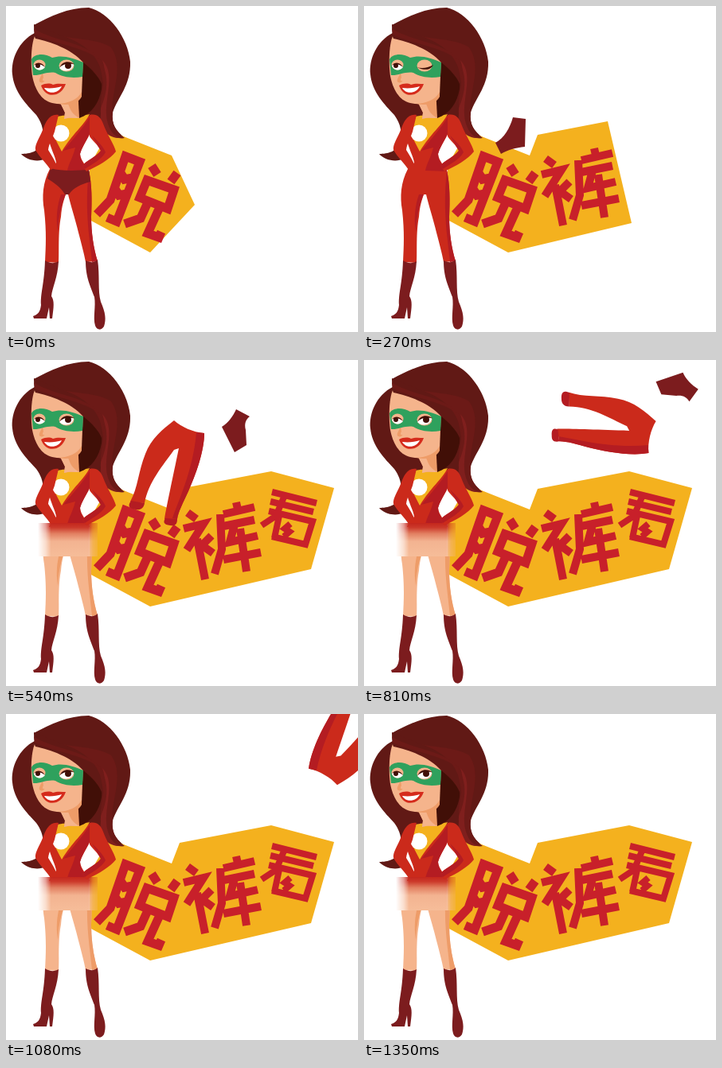
These frames come from a looping animation (442 by 410 pixels, 1.62 s). An HTML page:

```html
<!DOCTYPE html>
<html lang="zh">
<head>
<meta charset="utf-8">
<title>脱裤看</title>
<style>
  html, body { margin: 0; width: 100%; height: 100%; overflow: hidden; background: #fff; }
  svg { display: block; width: 442px; height: 410px; }
  .hair { fill: #611915; }
  .wave { fill: #6c1a17; }
  .lock { fill: #7f1f1d; }
  .deep { fill: #410f07; }
  .skin { fill: #f5b48c; }
  .tan { fill: #ee9c68; }
  .red { fill: #cb2a1b; }
  .shade { fill: #b41c22; }
  .dark { fill: #7c1c1e; }
  .gold { fill: #f4b11e; }
  .ink { fill: none; stroke: #c8202a; }
</style>
</head>
<body>
<svg viewBox="0 0 442 410">
  <defs>
    <linearGradient id="fade" x2="0" y2="1">
      <stop offset="0" stop-color="#c4261d"/>
      <stop offset=".14" stop-color="#cc3a2b"/>
      <stop offset=".32" stop-color="#e28062"/>
      <stop offset=".55" stop-color="#f3b391"/>
      <stop offset="1" stop-color="#f6bd99"/>
    </linearGradient>
    <linearGradient id="sides">
      <stop offset="0" stop-color="#000"/>
      <stop offset=".13" stop-color="#777"/>
      <stop offset=".22" stop-color="#fff"/>
      <stop offset=".85" stop-color="#fff"/>
      <stop offset=".92" stop-color="#777"/>
      <stop offset="1" stop-color="#333"/>
    </linearGradient>
    <mask id="soft"><rect x="40" y="205" width="75" height="42" fill="url(#sides)"/></mask>
    <clipPath id="low"><path d="M0 247H442V410H0Z"/></clipPath>
    <path id="legs" d="M55 205C46 222 45 240 48 257C51 285 50 302 49 322L66 323C67 310 65 285 69 265C70 251 73 243 75 237L78 237C81 250 87 268 91 285C95 300 98 312 100 322L115 321C110 305 107 285 107 265C108 245 108 225 104 206Z"/>
    <path id="legShade" d="M75 237C70 248 66 264 65 284C62 265 65 248 69 237ZM104 207C101 235 101 262 105 295L108 322L115 321C110 305 107 285 107 265C108 245 108 225 104 207Z"/>
  </defs>

  <path class="hair" d="M36 34C16 44 6 67 8 86C10 108 26 124 38 137C46 148 49 160 44 172C42 183 30 186 19 186C26 194 40 197 50 192L56 150L104 150C107 160 114 168 126 170L150 166C138 158 132 148 134 134C140 115 157 100 156 70C153 40 130 8 104 2C78 2 55 13 35 24Z"/>

  <path id="board" class="gold"/>
  <path class="wave" d="M36 24C62 46 106 36 132 52C150 78 130 112 134 134C132 148 138 158 149 166C132 168 122 156 118 140C126 100 124 70 98 62Z"/>
  <path class="lock" d="M121 68C140 88 120 120 128 148C132 160 138 166 148 166C128 168 118 156 119 136C118 116 130 96 121 68Z"/>

  <g role="img" aria-label="脱裤看" class="ink">
    <path stroke-width="11" d="M114 262L131 244L150 189L168 196L139 271L127 266M144 210L149 218L159 216M137 230L142 238L152 236M183 201L190 212M215 210L207 221M177 219L211 231L203 255L168 241ZM178 247L169 267L149 274M193 253L178 286L192 291L195 284"/>
    <path data-on="12345" stroke-width="10" d="M228 192L239 200M223 212L248 206L227 239M240 225L250 276M258 221L246 233L260 243M289 179L292 192M273 194L312 185M269 194L271 238L262 269M273 209L312 201M288 203L281 229L316 221M273 251L320 242M294 212L302 266"/>
    <path data-on="2345" stroke-width="8" d="M334 166L390 180M332 178L386 191M350 170L339 196L321 208M330 190L385 203L376 232L334 222M343 196L337 224M357 206L350 212L356 216L349 222"/>
  </g>

  <g data-on="01">
    <use href="#legs" class="red"/>
    <use href="#legShade" class="shade"/>
  </g>
  <g data-on="2345" clip-path="url(#low)">
    <use href="#legs" class="skin"/>
    <use href="#legShade" class="tan"/>
  </g>
  <path class="dark" d="M49 320C55 324 61 324 66 321C65 342 58 354 57 365C61 371 60 378 58 393H55L54 379L51 393H35L34 390C40 388 43 385 44 376C43 362 48 350 49 320ZM100 320C106 323 111 323 115 319C118 340 115 358 119 372C125 386 126 394 123 403C120 408 114 408 112 402C109 392 113 378 111 366C106 352 100 342 100 320Z"/>

  <path class="red" d="M56 140L112 138C110 160 97 172 93 186C94 196 102 201 105 210H54C55 206 60 202 63 197C62 189 56 180 53 165Z"/>
  <path class="shade" d="M106 138C97 154 80 172 72 182L87 178C84 191 79 197 77 207L104 208C98 200 93 194 93 186C97 172 109 160 111 140Z"/>
  <path class="gold" d="M65 139C74 136 96 139 105 136C98 150 84 160 70 183L58 160Z"/>
  <circle cx="69" cy="160" r="10.5" fill="#fff"/>
  <path class="dark" data-on="0" d="M56 204C70 208 88 207 104 206L106 221C94 224 84 229 79 237H74C69 228 60 222 52 217Z"/>

  <rect data-on="2345" x="40" y="205" width="75" height="42" fill="url(#fade)" mask="url(#soft)"/>

  <path class="red" d="M66 137C54 135 50 146 46 156C42 166 36 174 37 181C42 190 50 197 56 206L64 202C62 195 58 189 53 181C54 173 58 167 61 158Z"/>
  <path class="red" d="M105 137C114 135 119 140 122 148C126 160 136 174 138 183C130 193 116 201 101 208L96 201C101 194 112 191 119 182C115 174 109 170 105 164Z"/>
  <path class="shade" d="M119 182C112 191 101 194 96 201L99 205C108 199 120 193 125 184C122 176 114 169 108 163Z"/>

  <path class="tan" d="M67 118L92 112V141C86 141 79 140 73 142L74 134Z"/>
  <path class="skin" d="M67 120L78 123C81 131 83 136 92 141C86 141 79 140 73 142L74 134Z"/>
  <path class="deep" d="M88 62C108 64 122 82 120 104C117 122 108 135 92 141Z"/>
  <path class="skin" d="M36 38C31 50 31 75 33 88C36 104 44 119 58 122C72 125 88 123 95 112L97 62L60 38Z"/>
  <path class="tan" d="M46 84C43 90 40 94 43 96C45 97 47 96 49 94C46 95 45 93 47 90ZM95 108C90 118 78 122 66 123C80 126 91 122 95 114Z"/>
  <path fill="#2fa15d" d="M32 67C36 60 48 59 58 65C70 61 84 65 97 71L96 89C84 91 72 90 62 84C52 82 42 88 34 87Z"/>
  <path class="hair" d="M35 23C36 32 35 37 37 41C56 45 82 54 97 71C108 80 116 88 120 98C124 72 104 48 72 38Z"/>
  <path class="wave" d="M35 28C60 46 104 44 122 72C126 92 118 112 119 128C128 108 130 86 118 68C100 52 62 48 36 36Z"/>

  <ellipse class="skin" cx="42" cy="74" rx="7.5" ry="6.5"/>
  <path fill="#fff" d="M35 75C39 71 45 72 49 77C45 82 38 82 35 75Z"/>
  <circle cx="40" cy="75" r="3" class="deep"/>
  <path class="deep" d="M35 75C39 69 46 71 49 77C45 73 39 72 35 75Z"/>
  <ellipse class="skin" cx="76" cy="75" rx="9.5" ry="7.5"/>
  <g data-on="02345">
    <path fill="#fff" d="M67 78C71 71 79 71 85 74C83 82 73 84 67 78Z"/>
    <circle cx="78" cy="75" r="4" class="deep"/>
    <path class="deep" d="M67 78C71 68 80 69 86 73C79 72 72 72 67 78Z"/>
  </g>
  <path data-on="1" class="deep" d="M66 77C73 79 80 78 87 74C84 80 78 82 66 77Z"/>
  <path fill="#d52b1c" d="M44 100C50 97 55 97 59 99C64 97 70 98 75 98C70 114 50 118 44 100Z"/>
  <path fill="#fff" d="M48 103C56 104 64 103 70 101C66 110 53 112 48 103Z"/>

  <g id="pants">
    <path class="red" d="M211 76C220 84 235 91 249 92C249 115 238 145 229 165C222 180 216 192 215 200L199 200C202 182 209 150 217 111L211 113C197 133 179 153 174 180L156 178C166 160 166 140 175 118C182 99 197 87 211 76Z"/>
    <path class="shade" d="M249 92C249 115 238 145 229 165C222 180 216 192 215 200L209 199C215 180 235 140 239 91Z"/>
    <path class="shade" d="M157 177L174 180C173 187 168 189 163 188C155 187 152 184 157 177ZM200 199L215 200C215 208 211 209 206 208C198 207 197 204 200 199Z"/>
  </g>
  <path data-on="1" class="dark" d="M187 140L203 142L202 177C191 178 180 181 172 186L165 172C176 166 183 154 187 140Z"/>
  <path id="briefs" class="dark" d="M289 62L306 71C301 75 299 80 301 88L302 107L287 116L271 84C279 79 285 71 289 62Z"/>
</svg>
<script>
  const STEP = 270, COUNT = 6;
  const $ = id => document.getElementById(id);
  const wide = "M130 157L208 188L218 162L333 140L412 161L383 263L181 310L105 269V200Z";
  const boards = [
    "M130 157L208 188L237 250L181 310L105 269V200Z",
    "M130 157L208 188L218 162L306 145L336 273L181 310L105 269V200Z"
  ];
  // step: [x, y, turn in degrees]
  const flights = [
    { el: $("pants"), home: [230, 84], at: { 2: [230, 84, 0], 3: [362, 97, 80], 4: [398, 79, 187] } },
    { el: $("briefs"), home: [289, 89], at: { 2: [289, 89, 0], 3: [393, 33, 98] } }
  ];
  const parts = [...document.querySelectorAll("[data-on]")];
  const show = (el, on) => { el.style.display = on ? "" : "none"; };

  function pose(step) {
    for (const el of parts) show(el, el.dataset.on.includes(step));
    $("board").setAttribute("d", boards[step] || wide);
    for (const { el, home, at } of flights) {
      const spot = at[step];
      show(el, spot);
      if (!spot) continue;
      const [x, y, turn] = spot;
      el.setAttribute("transform", `translate(${x} ${y}) rotate(${turn}) translate(${-home[0]} ${-home[1]})`);
    }
  }

  let last = -1;
  function tick() {
    const step = Math.floor(performance.now() / STEP) % COUNT;
    if (step !== last) pose(last = step);
    requestAnimationFrame(tick);
  }
  tick();
</script>
</body>
</html>
```
